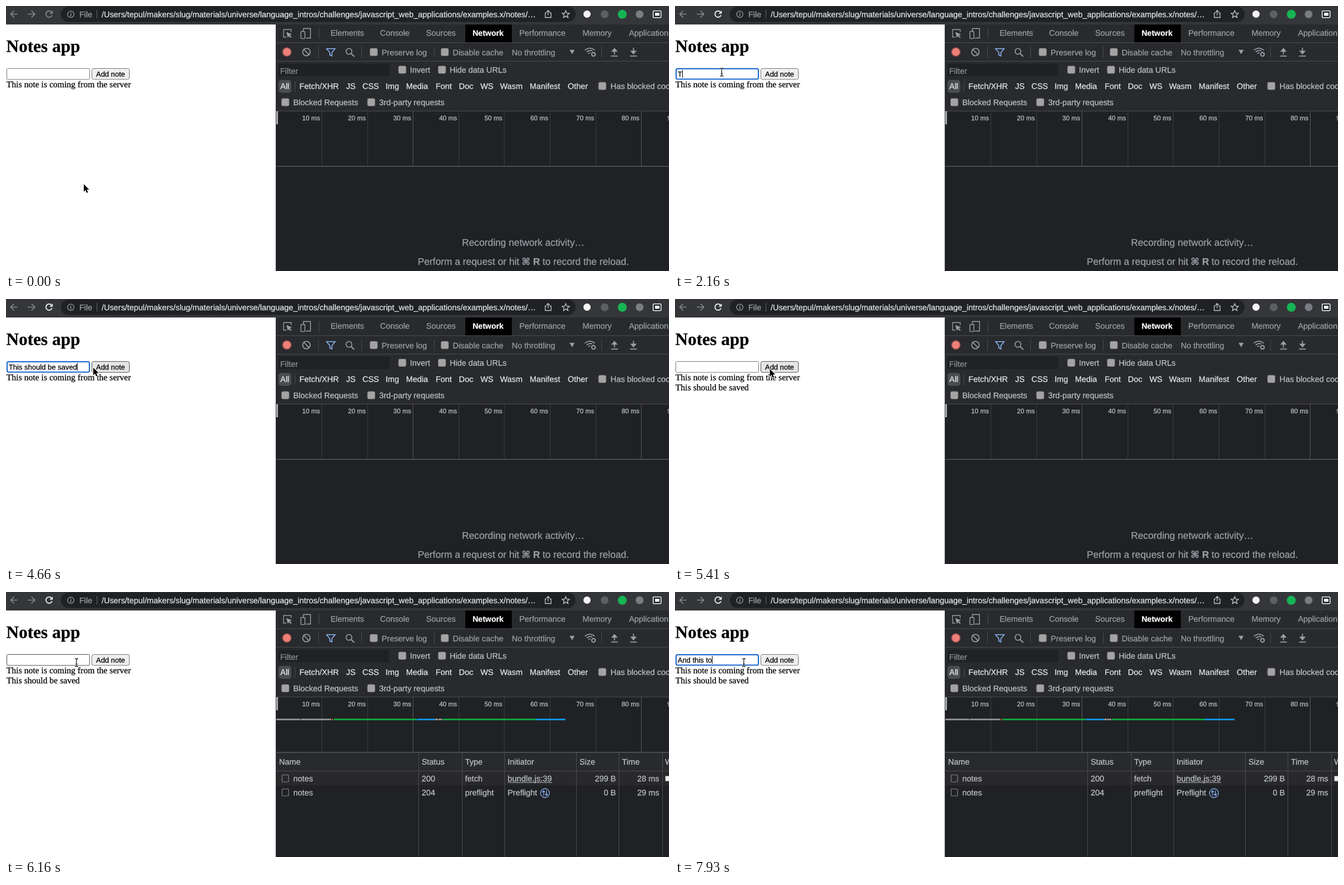
Recreate the animation shown at these times as an HTML page with a canvas. Size 1185 by 473 pixels, loop 8000 ms.

```html
<!DOCTYPE html>
<html lang="en">
<head>
<meta charset="utf-8">
<title>Notes app</title>
<style>
html, body { margin: 0; width: 100%; height: 100%; overflow: hidden; background: #fff; }
canvas { display: block; width: 1185px; height: 473px; }
</style>
</head>
<body>
<canvas id="stage" width="1185" height="473"></canvas>
<script>
const c = document.getElementById('stage').getContext('2d');
c.textRendering = 'geometricPrecision';

const LOOP = 8000;
const SANS = '"Liberation Sans", Arial, sans-serif';
const SERIF = '"Liberation Serif", "Times New Roman", serif';
const BAR = '#292a2d', DARK = '#202124', LINE = '#494c50';
const GREY = '#9aa0a6', SOFT = '#bdc1c6', LIGHT = '#e4e6e9', BLUE = '#8ab4f8';

// Each entry holds from its time until the next one.
const typed = [
  [0, ''], [1560, ''], [2160, 'T'], [2310, 'Thi'], [2460, 'This '], [2610, 'This sh'],
  [3310, 'This should'], [3460, 'This should b'], [3610, 'This should be '],
  [3760, 'This should be s'], [4030, 'This should be sav'], [4330, 'This should be saved'],
  [5410, ''], [6460, ''], [7050, 'A'], [7190, 'An'], [7340, 'And '], [7490, 'And t'],
  [7640, 'And thi'], [7780, 'And this '], [7930, 'And this to']
];
const pointer = [
  [1270, 80, 114, 'beam'], [1410, 82, 116, 'beam'], [1560, 83.5, 118, 'beam'],
  [4510, 122, 121, 'beam'], [4660, 156, 122.5, 'arrow'], [4810, 164, 124, 'arrow'],
  [4960, 169.5, 125, 'arrow'], [6010, 138, 126, 'beam'], [6160, 126, 126, 'beam'],
  [6460, 123, 126, 'beam']
];
const at = (list, t) => list.reduce((hit, e) => e[0] <= t ? e : hit, list[0]);
const within = (t, a, b) => t >= a && t < b;

function rect(x, y, w, h, fill) {
  c.fillStyle = fill;
  c.fillRect(x, y, w, h);
}
function round(x, y, w, h, r, fill, stroke, lw = 1) {
  c.beginPath();
  c.roundRect(x, y, w, h, r);
  if (fill) { c.fillStyle = fill; c.fill(); }
  if (stroke) { c.strokeStyle = stroke; c.lineWidth = lw; c.stroke(); }
}
function text(s, x, y, color = SOFT, size = 14.4, opt = {}) {
  c.font = `${opt.bold ? 'bold ' : ''}${size}px ${opt.family || SANS}`;
  c.textAlign = opt.align || 'left';
  c.fillStyle = c.strokeStyle = color;
  c.lineWidth = .25;
  c.fillText(s, x, y);
  c.strokeText(s, x, y); // slightly heavier strokes
}
function disc(x, y, r, fill) {
  c.beginPath();
  c.arc(x, y, r, 0, 7);
  c.fillStyle = fill;
  c.fill();
}
function path(d, color, lw = 1.5, fill = false) {
  const p = new Path2D(d);
  c.lineWidth = lw;
  c.strokeStyle = c.fillStyle = color;
  if (fill) c.fill(p); else c.stroke(p);
}
function ring(x, y, r, color, lw = 1.5) {
  c.beginPath();
  c.arc(x, y, r, 0, 7);
  c.strokeStyle = color;
  c.lineWidth = lw;
  c.stroke();
}
const check = (x, y) => round(x, y, 13.5, 13.5, 2.5, '#a3a3a3', '#6f7072', .8);

function browserBar(t) {
  rect(0, 0, 1185, 33, '#35363a');
  round(98, 1, 920, 27.5, 13.75, DARK);
  path('M20.5 14.5H9M14.5 8.5L8.5 14.5L14.5 20.5', '#85888c', 1.7);
  path('M39 14.5H51M45.5 8.5L51.5 14.5L45.5 20.5', '#85888c', 1.7);
  const tint = t < 680 ? '#85888c' : '#f1f3f4';
  path('M81.3 10.8A5.6 5.6 0 1 0 82.3 16.3', tint, 1.8);
  path('M83.5 8V13.7H77.8Z', tint, 1, true);
  ring(115.8, 14.8, 5.6, GREY, 1.3);
  rect(115.1, 13.7, 1.5, 4.3, GREY);
  rect(115.1, 11.3, 1.5, 1.5, GREY);
  text('File', 131, 20, GREY);
  rect(162, 7, 1, 15, '#5f6368');
  text('/Users/tepul/makers/slug/materials/universe/language_intros/challenges/' +
    'javascript_web_applications/examples.x/notes/…', 171, 20, LIGHT);
  path('M966 12.5H963.8V20.5H974.2V12.5H972M969 16.5V8.5M966 11L969 8L972 11', '#c4c7cb', 1.3);
  path('M1000.5 8.2L1002.3 12.6L1007 13L1003.4 16L1004.5 20.6L1000.5 18.1L996.5 20.6L997.6 16L994 13L998.7 12.6Z', '#c4c7cb', 1.3);
  disc(1038.5, 14.5, 6.5, '#f4f4f4');
  disc(1070, 14.8, 7, '#5d5f63');
  disc(1101.5, 14.8, 8, '#16b454');
  disc(1132.5, 14.8, 7, '#797c80');
  round(1156.7, 8.7, 14, 12, 1.5, '#1b1c1e', '#f1f3f4', 1.6);
  rect(1160, 12, 8, 5.5, '#f1f3f4');
}

function tabs() {
  rect(482, 33, 703, 33, BAR);
  path('M501 55.5H496.2V42H509.7V46.5', GREY, 1.3);
  path('M501 46.5L511.2 50.4L507.2 52L510.6 55.6L509 57L505.6 53.4L504 57.2Z', GREY, 1, true);
  path('M531.5 45V40.3H544.3V57.3H536', GREY, 1.4);
  round(527, 45.5, 7.3, 12.6, 1, null, GREY, 1.4);
  rect(559, 40, 1, 18, LINE);
  rect(821, 33, 83, 32, '#000');
  [['Elements', 580], ['Console', 668.5], ['Sources', 751], ['Performance', 917.5],
   ['Memory', 1030.5], ['Application', 1113.5]].forEach(([s, x]) => text(s, x, 53, GREY));
  text('Network', 834, 53, '#fff', 14, { bold: true });
  rect(482, 65, 703, 1, LINE);
}

function toolbar() {
  rect(482, 66, 703, 121, BAR);
  ring(502, 82, 7.8, '#8c4a48', 1.5);
  disc(502, 82, 7, '#ee8079');
  ring(537, 82.2, 6.7, GREY, 1.7);
  path('M532.3 77.5L541.7 86.9', GREY, 1.7);
  path('M573 76.3H588.2L582.5 83V89.3L578.7 87.6V83Z', BLUE, 1.6);
  ring(613, 81, 5.2, GREY, 1.6);
  path('M616.7 84.7L622.5 90.2', GREY, 2);
  [558, 635, 765, 1064].forEach(x => rect(x, 72, 1, 20, LINE));
  check(650.5, 75.5);
  text('Preserve log', 671.5, 87.5, GREY);
  check(777.5, 75.5);
  text('Disable cache', 798.5, 87.5, GREY);
  text('No throttling', 904, 87.5, GREY);
  path('M1007.3 78.3H1016.3L1011.8 86Z', GREY, 1, true);
  path('M1034.5 79Q1043.5 71.5 1052.5 79M1037.8 82.2Q1043.5 77.6 1048 80.6M1040.7 85.2Q1043 83.3 1044.6 84', GREY, 1.6);
  ring(1050, 86.2, 3.2, GREY, 2);
  path('M1081.5 89.3H1093.5M1087.5 86.5V77', GREY, 1.8);
  path('M1081.7 81.5L1087.5 74.8L1093.3 81.5Z', GREY, 1, true);
  path('M1115.5 89.3H1127.5M1121.5 74.5V81', GREY, 1.8);
  path('M1115.7 79.8L1121.5 86.5L1127.3 79.8Z', GREY, 1, true);
  rect(482, 98, 703, 1, LINE);

  rect(487, 103, 198, 22, DARK);
  text('Filter', 490, 120.5, '#8d9196');
  [[701.5, 107, 'Invert', 722], [772.5, 107, 'Hide data URLs', 793],
   [1059, 136, 'Has blocked cookies', 1080.5], [492.5, 165, 'Blocked Requests', 513.5],
   [646, 165, '3rd-party requests', 667]].forEach(([x, y, s, tx]) => {
    check(x, y);
    text(s, tx, y + 12, SOFT);
  });
  round(487, 132, 23, 23, 5, '#4b4c4f');
  rect(516, 134, 1, 19, LINE);
  [['All', 490.3], ['Fetch/XHR', 524.5], ['JS', 608], ['CSS', 637], ['Img', 678.5],
   ['Media', 715], ['Font', 768], ['Doc', 809.5], ['WS', 848], ['Wasm', 883],
   ['Manifest', 936], ['Other', 1004]].forEach(([s, x]) => text(s, x, 148, LIGHT));
  rect(482, 187, 703, 1, LINE);
}

function overview(loaded) {
  rect(482, 188, 703, 285, DARK);
  for (let i = 1; i < 10; i++) {
    const x = Math.round(482.3 + i * 81.6);
    rect(x, 188, 1, 98, i === 3 || i === 8 ? '#55585c' : '#3b3d41');
    text(i * 10 + ' ms', x - 3, 203.5, SOFT, 11.7, { align: 'right' });
  }
  rect(483, 188, 3, 23, '#c5c7c9');
  rect(484, 189, 1, 21, '#8a8c8f');
  rect(482, 285.5, 703, 1.5, '#55585c');
  if (!loaded) return;
  const green = '#10a33f', blue = '#118fe0', grey = '#8c8d8c';
  [[483, 43, grey], [527, 54, grey], [582.5, 2, '#c47a20'], [586, 148, green],
   [734.5, 32.5, blue], [767.5, 4, '#b0a595'], [772.5, 7.5, grey], [781, 166, green],
   [947, 53, blue]].forEach(([x, w, color]) => rect(x, 226, w, 3, color));
}

function idleHint() {
  text('Recording network activity…', 815, 427.5, GREY, 17.28);
  text('Perform a request or hit', 736, 461.5, GREY, 17.28);
  text('⌘', 921.5, 461.5, GREY, 17, { bold: true, family: '"DejaVu Sans", "Noto Sans CJK JP", sans-serif' });
  text('R', 942, 461.5, GREY, 17.28, { bold: true });
  text('to record the reload.', 959, 461.5, GREY, 17.28);
}

function requests() {
  rect(482, 287, 703, 32, BAR);
  rect(482, 320, 703, 25, '#29292b');
  rect(482, 319, 703, 1, LINE);
  [737, 815, 891, 1019, 1095, 1173].forEach(x => rect(x, 287, 1, 186, LINE));
  [['Name', 488], ['Status', 743], ['Type', 820.5], ['Initiator', 896.5], ['Size', 1025],
   ['Time', 1101], ['Waterfall', 1178]].forEach(([s, x]) => text(s, x, 307.5, SOFT));
  [[338, '200', 'fetch', '299 B', '28 ms'], [363, '204', 'preflight', '0 B', '29 ms']]
    .forEach(([y, status, type, size, time]) => {
      round(493.5, y - 11.5, 11.5, 12.5, 1, null, '#7f8388', 1.2);
      text('notes', 513.5, y, SOFT);
      text(status, 743, y, SOFT);
      text(type, 820.5, y, SOFT);
      text(size, 1090, y, SOFT, 14.4, { align: 'right' });
      text(time, 1167.5, y, SOFT, 14.4, { align: 'right' });
    });
  text('bundle.js:39', 896.5, 338, SOFT, 14.7);
  rect(897, 339.5, 79, 1, SOFT);
  text('Preflight', 896.5, 363, SOFT);
  ring(963.3, 359, 8, BLUE, 1.3);
  path('M961 363.5V355M958.3 357.7L961 354.8L963 357.2M965.8 354.5V363M963.6 360.6L965.8 363.2L968.5 360.3', BLUE, 1.3);
  rect(1178.5, 328.5, 6.5, 9, '#f0f0f0');
}

function page(t) {
  rect(0, 33, 482, 440, '#fff');
  text('Notes app', .5, 82, '#000', 31.06, { bold: true, family: SERIF });

  const [since, value] = at(typed, t);
  const focus = within(t, 1560, 5110) || t >= 6460;
  const over = within(t, 1410, 1560) || within(t, 6160, 6460);
  if (focus) round(2, 112, 147, 18.5, 2.5, '#fff', '#1765cc', 2);
  else round(1.5, 111.5, 148, 19.5, 2, '#fff', over ? '#4f4f4f' : '#767676');
  text(value, 4.8, 125.6, '#000', 12.94);
  // The caret blinks, starting over with each key.
  if (focus && (t - since) % 1000 < 440) {
    rect(Math.round(4.6 + c.measureText(value).width), 114, 1, 14, '#000');
  }

  const pressed = within(t, 5110, 5260), hover = within(t, 4660, 6010);
  round(153.5, 111.5, 67, 19.5, 3, pressed ? '#f5f5f5' : hover ? '#e5e5e5' : '#efefef',
    hover && !pressed ? '#4f4f4f' : '#767676');
  text('Add note', 161, 125.6, '#000', 12.94);

  text('This note is coming from the server', .8, 145, '#000', 15.58, { family: SERIF });
  if (t >= 5410) text('This should be saved', .8, 162.5, '#000', 15.58, { family: SERIF });
}

function cursor(t) {
  let [, x, y, kind] = at(pointer, t);
  if (t < 1270) {
    const k = t < 240 ? 0 : (Math.floor((t - 240) / 147.2) + 1) / 8;
    [x, y, kind] = [139 - 59 * k, 318 - 204 * k, 'arrow'];
  }
  c.save();
  c.translate(x, y);
  c.lineJoin = 'round';
  if (kind === 'arrow') {
    const d = 'M0 0V13.4L3 10.6L5.1 15.6L7.5 14.6L5.4 9.7H9.7Z';
    path(d, '#fff', 2.2);
    path(d, '#000', 1, true);
  } else {
    const d = 'M-3 -7.2Q0 -7.2 0 -5Q0 -7.2 3 -7.2M0 -5V5M-3 7.2Q0 7.2 0 5Q0 7.2 3 7.2M-1.8 2.5H1.8';
    path(d, 'rgba(255,255,255,.8)', 2.6);
    path(d, '#111', 1.2);
  }
  c.restore();
}

function draw(now) {
  const t = now % LOOP, loaded = t >= 5560;
  browserBar(t);
  tabs();
  toolbar();
  overview(loaded);
  if (loaded) requests(); else idleHint();
  rect(482, 33, 1, 440, '#3a3c40');
  page(t);
  cursor(t);
}

const start = performance.now();
function tick() {
  draw(performance.now() - start);
  requestAnimationFrame(tick);
}
tick();
</script>
</body>
</html>
```
